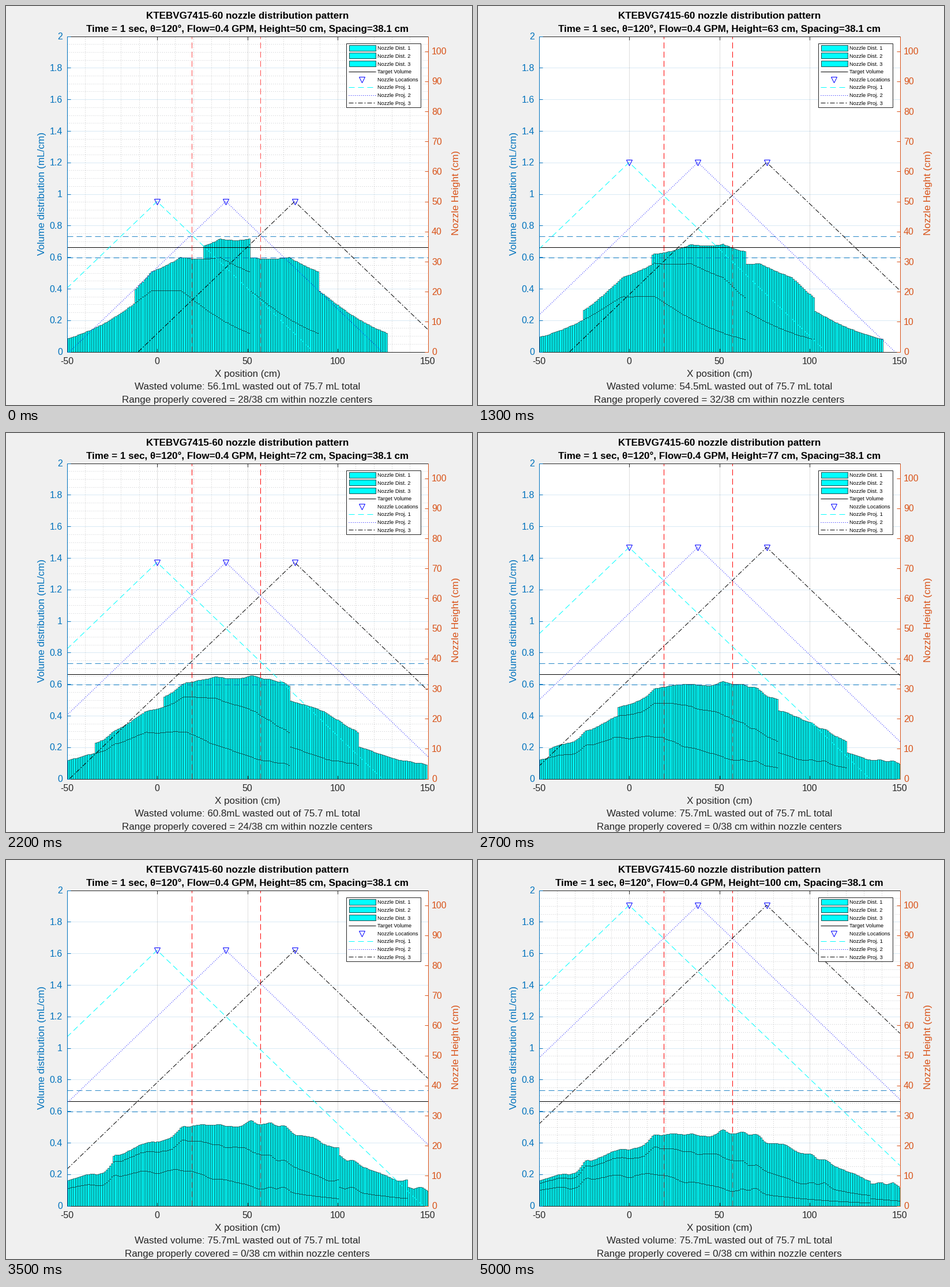
Animation of 808 by 693 pixels, one loop 5100 ms. Source, as a matplotlib script:

```python
import numpy as np
import matplotlib.pyplot as plt
from matplotlib.animation import FuncAnimation
from matplotlib.collections import PolyCollection

W, H, DPI = 808, 693, 64
PX = 72 / DPI                                  # one pixel in points
LEFT, RIGHT, TOP, BOTTOM = 105.5, 731.5, 52.5, 600.5

plt.rcParams["font.family"] = ["Liberation Sans", "DejaVu Sans"]

BLUE, ORANGE, INK = (0, .447, .741), (.851, .325, .098), (.15, .15, .15)
DASH, DOT, DASHDOT = (0, (10, 6)), (0, (1, 2.5)), (0, (8, 3, 2, 3))
SOLID = "-"

SPACING = 38.1
NOZZLES = SPACING * np.arange(3)
TARGET = 0.664
SLOPE = 1 / np.tan(np.radians(60))
MODEL = "KTEBVG7415-60"
CM = np.arange(-50, 151)

# Ripples of the spray: centre (cm), width (cm), size (mL/cm)
RIPPLES = [(-31, 5, -.030), (-24, 2.5, .022), (0, 3, -.015), (10, 4, .012),
           (30, 4, -.017), (56, 4, -.012), (63, 2.5, .015), (70, 3.5, .030)]


def ease(v, start, end):
    t = np.clip((v - start) / (end - start), 0, 1)
    return t * t * (3 - 2 * t)


def spray(x, height):
    """Volume per cm at offset x from a nozzle: a flat-topped bell plus ripples
    that grow as the nozzle rises."""
    top = .39 - .195 * ease(height, 50, 95)
    width = 37 + 27 * ease(height, 56, 86)
    bell = 1.15 * top * np.exp(-(np.abs(x - 5) / width) ** 1.3)
    d = np.minimum(top, bell)
    for c, w, size in RIPPLES:
        d = d + size * ease(height, 60, 90) * np.exp(-((x - c) / w) ** 2)
    reach = height + 1 + 1.2 * max(height - 73, 0)
    return np.where(np.abs(x) <= reach, d, 0)


def wasted(height):
    return np.interp(height, [50, 63, 72, 77, 85, 92, 100],
                     [56.1, 54.5, 60.8, 75.7, 75.7, 75.8, 75.7])


def covered(height):
    return round(np.interp(height, [50, 63, 72, 77], [28, 32, 24, 0]))


fig = plt.figure(figsize=(W / DPI, H / DPI), dpi=DPI, facecolor="#f0f0f0")
box = [LEFT / W, 1 - BOTTOM / H, (RIGHT - LEFT) / W, (BOTTOM - TOP) / H]


def layer(rect, xlim, ylim, z):
    ax = fig.add_axes(rect, zorder=z)
    ax.set(xlim=xlim, ylim=ylim)
    ax.axis("off")
    return ax


vol = layer(box, (-50, 150), (0, 2), 1)        # volume axis
hgt = layer(box, (-50, 150), (0, 105), 2)      # nozzle height axis
page = layer([0, 0, 1, 1], (0, W), (H, 0), 3)  # stage in pixels


def line(ax, x, y, color, style=SOLID, z=2, **kw):
    return ax.plot(x, y, color=color, ls=style, lw=PX, zorder=z,
                   dash_capstyle="butt", solid_capstyle="butt", **kw)[0]


def text(x, y, s, size, color=INK, ha="center", **kw):
    return page.text(x, y, s, fontsize=size * PX, color=color, ha=ha,
                     va=kw.pop("va", "baseline"), **kw)


def px_x(x):
    return LEFT + (x + 50) / 200 * (RIGHT - LEFT)


def px_y(part):
    return BOTTOM - part * (BOTTOM - TOP)


# Background and grid
vol.add_patch(plt.Rectangle((-50, 0), 200, 2, fc="white", ec="none", zorder=0))
minor = []
for x in range(-40, 150, 10):
    if x % 50:
        minor.append(line(vol, [x, x], [0, 2], (.1, .1, .1), DOT, 1, alpha=.25))
for k in range(1, 40):
    if k % 4:
        minor.append(line(vol, [-50, 150], [k / 20] * 2, (.1, .15, .2), DOT, 1,
                          alpha=.25))
for x in (0, 50, 100):
    line(vol, [x, x], [0, 2], INK, z=1, alpha=.15)
for k in range(1, 10):
    line(vol, [-50, 150], [k / 5] * 2, BLUE, z=1, alpha=.15)

# Bars and limits
bars = [PolyCollection([], facecolors="cyan", edgecolors="black",
                       linewidths=.5 * PX, snap=True, zorder=3 + k)
        for k in range(3)]
for b in bars:
    vol.add_collection(b, autolim=False)
line(vol, [-50, 150], [TARGET] * 2, "black", z=8)
for f in (.9, 1.1):
    line(vol, [-50, 150], [TARGET * f] * 2, BLUE, DASH, 8, alpha=.85)

midpoints = [SPACING * .5, SPACING * 1.5]
red_under = [line(vol, [x, x], [0, 2], "red", DASH, 2) for x in midpoints]
for x in midpoints:
    line(hgt, [x, x], [0, 105], "red", DASH, 1, alpha=.5)

# Nozzles and their spray edges
PROJ = [("cyan", DASH), ("blue", DOT), ("black", DASHDOT)]
edges = [line(hgt, [], [], c, s, 3) for c, s in PROJ]
MARK = dict(marker="v", ms=10 * PX, mfc="none", mec="blue", mew=PX, ls="none")
marks = hgt.plot(NOZZLES, [50] * 3, zorder=5, **MARK)[0]

# Frame, ticks and tick labels
for y in (TOP, BOTTOM):
    line(page, [LEFT, RIGHT], [y, y], INK)
line(page, [LEFT] * 2, [TOP, BOTTOM], BLUE, z=3)
line(page, [RIGHT] * 2, [TOP, BOTTOM], ORANGE, z=3)
for x in range(-50, 151, 50):
    p = px_x(x)
    if -50 < x < 150:
        line(page, [p, p], [BOTTOM, BOTTOM - 6], INK)
        line(page, [p, p], [TOP, TOP + 6], INK)
    text(p, 622.5, str(x), 16)
for k in range(11):
    p = px_y(k / 10)
    line(page, [LEFT, LEFT + 6], [p, p], BLUE, z=3)
    text(98, p + 5.7, f"{k / 5:g}", 16, BLUE, "right")
    p = px_y(k * 10 / 105)
    line(page, [RIGHT - 6, RIGHT], [p, p], ORANGE, z=3)
    text(738, p + 5.7, str(k * 10), 16, ORANGE, "left")

# Titles and labels
MID = (LEFT + RIGHT) / 2
text(MID, 22, f"{MODEL} nozzle distribution pattern", 17, "black", weight="bold")
title = text(MID, 45, "", 17, "black", weight="bold")
text(MID, 644, "X position (cm)", 17)
waste_label = text(MID, 666.5, "", 17)
range_label = text(MID, 689, "", 17)
text(62, 325.5, "Volume distribution (mL/cm)", 17.3, BLUE, rotation=90,
     va="center")
text(781, 324.5, "Nozzle Height (cm)", 17.3, ORANGE, rotation=90, va="center")

# Legend
page.add_patch(plt.Rectangle((589.5, 64.5), 129, 111, fc="white", ec=INK,
                             lw=PX, zorder=6))
NAMES = ([f"Nozzle Dist. {k}" for k in (1, 2, 3)]
         + ["Target Volume", "Nozzle Locations"]
         + [f"Nozzle Proj. {k}" for k in (1, 2, 3)])
for k, name in enumerate(NAMES):
    y = 73 + 13.6 * k
    if k < 3:
        page.add_patch(plt.Rectangle((594.5, y - 5.5), 46, 10, fc="cyan",
                                     ec="black", lw=.7 * PX, zorder=7))
    elif k == 4:
        page.plot([617], [y + .5], zorder=7, **MARK)
    else:
        color, style = PROJ[k - 5] if k > 4 else ("black", SOLID)
        line(page, [594, 641], [y, y], color, style, 7)
    text(643.5, y + 3.4, name, 9.2, "black", "left", zorder=8)


def stack_bars(height):
    base = np.zeros(len(CM))
    for b, x0 in zip(bars, NOZZLES):
        top = base + spray(CM - x0, height)
        b.set_verts([[(x - .5, lo), (x - .5, hi), (x + .5, hi), (x + .5, lo)]
                     for x, lo, hi in zip(CM, base, top) if hi > lo])
        base = top


def update(n):
    height = 50 + n
    stack_bars(height)
    for e, x0 in zip(edges, NOZZLES):
        half = height / SLOPE
        # start at the visible border so the dashes begin there
        left = max(x0 - half, -50)
        right = min(x0 + half, 150)
        e.set_data([left, x0, right],
                   [height - (x0 - left) * SLOPE, height,
                    height - (right - x0) * SLOPE])
    marks.set_ydata([height] * 3)
    for m in minor:
        m.set_visible(n % 2 == 0)
    # translucent guides build up to full red
    for r in red_under:
        r.set_alpha(1 - 2 * .3 ** (n + 1))
    title.set_text(f"Time = 1 sec, θ=120°, Flow=0.4 GPM, Height={height} cm, "
                   f"Spacing={SPACING} cm")
    waste_label.set_text(f"Wasted volume: {wasted(height):.1f}mL wasted out of "
                         "75.7 mL total")
    range_label.set_text(f"Range properly covered = {covered(height)}/38 cm "
                         "within nozzle centers")


anim = FuncAnimation(fig, update, frames=51, interval=100, repeat=True,
                     repeat_delay=0)
plt.show()
```
